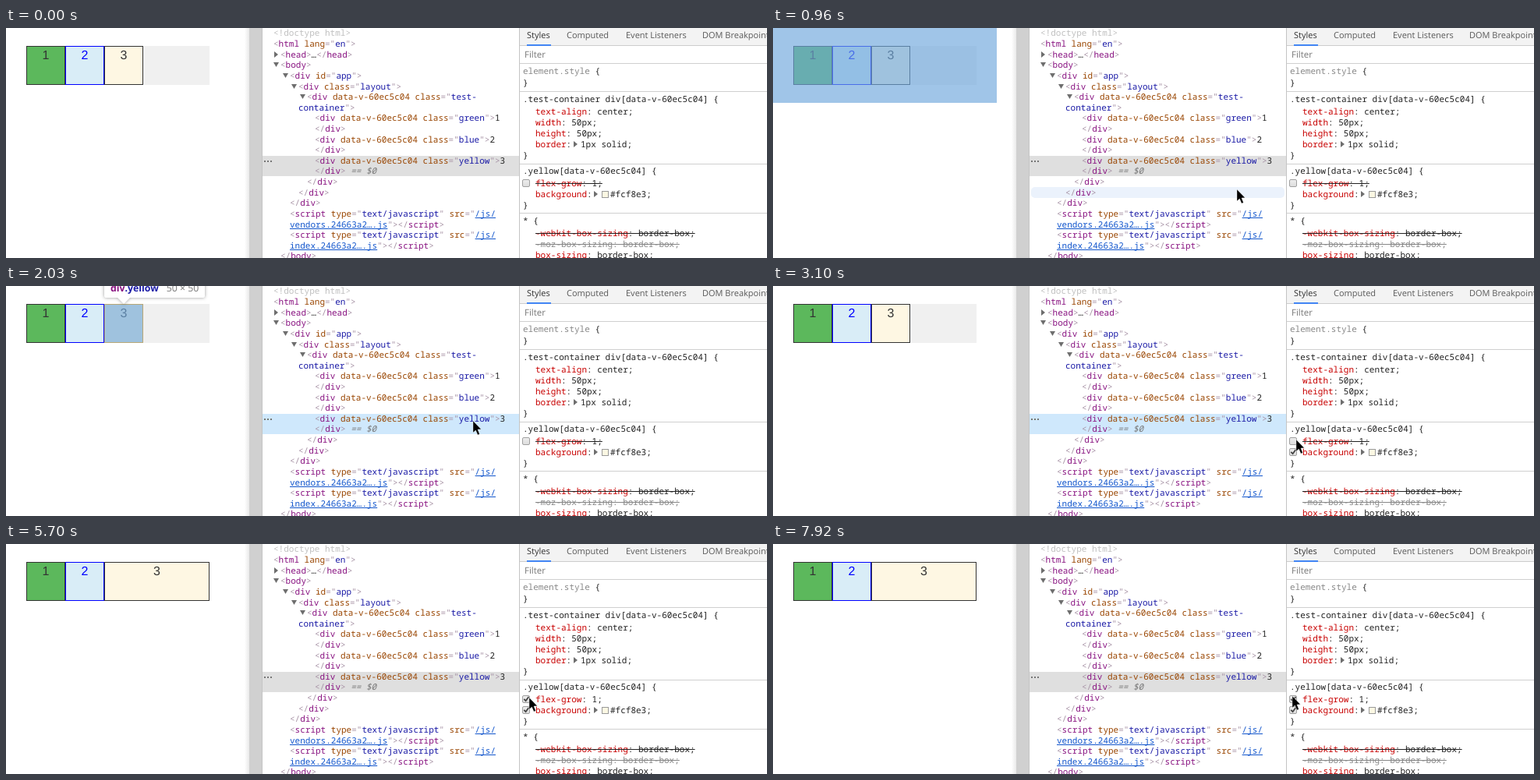
An HTML page with a canvas for the animation above (8 s loop, 976x295 px).

```html
<!DOCTYPE html>
<html lang="en">
<head>
<meta charset="utf-8">
<title>Flex grow in the inspector</title>
<style>
html, body { margin: 0; width: 100%; height: 100%; overflow: hidden; background: #fff; }
canvas { display: block; }
</style>
</head>
<body>
<canvas id="stage" width="976" height="295"></canvas>
<script>
const ctx = document.getElementById('stage').getContext('2d');
const LOOP = 8000;
const MONO = '11px "Noto Sans Mono", monospace';
const UI = '"Open Sans", sans-serif';
const COLORS = {
  p: '#a894a6', t: '#881280', a: '#994500', v: '#1a1aa6', l: '#1155cc',
  x: '#222', d: '#c0c0c0', g: '#888', i: '#777', r: '#c80000'
};

// "^k" switches to colour k of COLORS
const open = (name, rest = '') => `^p<^t${name}${rest}^p>`;
const close = name => `^p</^t${name}^p>`;
const attr = (name, value) => ` ^a${name}^p="^v${value}^p"`;
const scoped = ' ^adata-v-60ec5c04';
const item = (name, n) => open('div', scoped + attr('class', name)) + '^x' + n;
const script = '^p<^tscript' + attr('type', 'text/javascript') + ' ^asrc^p="^l/js/';
const file = name => `^l${name}.24663a2….js^p">` + close('script');

const TREE = [
  [343, '^d<!doctype html>'],
  [343, open('html', attr('lang', 'en'))],
  [352, open('head') + '^x…' + close('head'), 'right'],
  [352, open('body'), 'down'],
  [364, open('div', attr('id', 'app')), 'down'],
  [375, open('div', attr('class', 'layout')), 'down'],
  [386, '^p<^tdiv' + scoped + ' ^aclass^p="^vtest-', 'down'],
  [375, '^vcontainer^p">'],
  [396, item('green', 1)],
  [396, close('div')],
  [396, item('blue', 2)],
  [396, close('div')],
  [396, item('yellow', 3)],
  [396, close('div') + '^i == $0'],
  [386, close('div')],
  [375, close('div')],
  [364, close('div')],
  [364, script],
  [364, file('vendors')],
  [364, script],
  [364, file('index')],
  [352, close('body')]
];

const HOVER = { script: [233, 26], layout: [204, 14], blue: [137, 26] };

// Each step changes part of the state and holds until the next one
const STEPS = [
  [0, { cursor: null, hover: null, mark: null, focus: false, section: false, check: 0, grow: false }],
  [830, { cursor: [591, 237], hover: 'script' }],
  [960, { cursor: [595, 207], hover: 'layout', mark: 'layout' }],
  [1110, { cursor: [597, 187], hover: null, mark: 'yellow' }],
  [1260, { cursor: [599, 173] }],
  [2030, { focus: true }],
  [2440, { cursor: [616, 173] }],
  [2590, { cursor: [634, 178] }],
  [2710, { cursor: [652, 184] }],
  [2830, { cursor: [665, 190], mark: null, section: true }],
  [2950, { cursor: [671, 194] }],
  [3100, { cursor: [671, 197] }],
  [3410, { focus: false, check: 1 }],
  [3560, { check: 2 }],
  [3710, { grow: true }],
  [5850, { check: 0 }],
  [5970, { grow: false }],
  [6090, { cursor: [670, 196] }],
  [6240, { cursor: [640, 169], section: false, mark: 'yellow' }],
  [6390, { cursor: [625, 160], hover: 'blue', mark: 'blue' }],
  [6540, { cursor: [623, 154] }],
  [6670, { cursor: [621, 149] }],
  [6940, { cursor: [690, 172], hover: null, mark: null }],
  [7070, { cursor: [726, 188], section: true }],
  [7220, { cursor: [665, 194] }],
  [7650, { cursor: [666, 195], check: 1 }],
  [7800, { check: 2 }],
  [7920, { grow: true }]
];

const stateAt = t => Object.assign({}, ...STEPS.filter(s => s[0] <= t).map(s => s[1]));

function rect(x, y, w, h, color) {
  ctx.fillStyle = color;
  ctx.fillRect(x, y, w, h);
}

function frame(x, y, w, h, color) {
  ctx.strokeStyle = color;
  ctx.lineWidth = 1;
  ctx.strokeRect(x + .5, y + .5, w - 1, h - 1);
}

function poly(points, color) {
  ctx.beginPath();
  points.forEach(([x, y]) => ctx.lineTo(x, y));
  ctx.closePath();
  ctx.fillStyle = color;
  ctx.fill();
}

function text(str, x, y, font, color) {
  ctx.font = font;
  ctx.fillStyle = color;
  ctx.fillText(str, x, y);
  return ctx.measureText(str).width;
}

function code(str, x, y) {
  for (const run of str.split('^').slice(1)) {
    const key = run[0];
    const font = key === 'i' ? 'italic ' + MONO : MONO;
    const w = text(run.slice(1), x, y, font, COLORS[key]);
    if (key === 'l') rect(x, y + 1, w, 1, COLORS.l);
    x += w;
  }
  return x;
}

function struck(str, x, y, color) {
  const end = code(str, x, y);
  rect(x, y - 4, end - x, 1, color);
}

function arrow(x, y, dir) {
  poly(dir === 'right'
    ? [[x, y - 4], [x + 5, y], [x, y + 4]]
    : [[x - 1, y - 3], [x + 6, y - 3], [x + 2.5, y + 3]], '#6e6e6e');
}

function drawBox(x, w, n, fill, ink, edge) {
  rect(x, 23, w, 50, fill);
  frame(x, 23, w, 50, edge);
  ctx.textAlign = 'center';
  text(n, x + w / 2, 40, '16px "Liberation Sans", sans-serif', ink);
  ctx.textAlign = 'left';
}

function drawTip(x, name, w) {
  const mid = x + 25;
  ctx.save();
  ctx.shadowColor = 'rgba(0,0,0,.4)';
  ctx.shadowBlur = 4;
  ctx.beginPath();
  ctx.roundRect(x, -12, w, 27, 2);
  ctx.moveTo(mid - 8, 15);
  ctx.lineTo(mid, 23);
  ctx.lineTo(mid + 8, 15);
  ctx.fillStyle = '#fff';
  ctx.fill();
  ctx.restore();
  const bold = 'bold 12.3px ' + UI;
  let tx = x + 8;
  tx += text('div', tx, 7, bold, COLORS.t);
  tx += text('.' + name, tx, 7, bold, COLORS.v);
  text('50 × 50', tx + 10, 7, '12.3px ' + UI, '#777');
}

function drawMark(mark) {
  const content = 'rgba(111,168,220,.66)';
  if (mark === 'layout') return rect(0, 0, 287, 96, content);
  const x = mark === 'blue' ? 76 : 126;
  rect(x + 1, 24, 48, 48, content);
  frame(x, 23, 50, 50, 'rgba(255,229,153,.66)');
  drawTip(x, mark, mark === 'blue' ? 116 : 129);
}

function drawPage(s) {
  rect(26, 23, 235, 50, '#f0f0f0');
  drawBox(26, 50, '1', '#5cb85c', '#333', '#333');
  drawBox(76, 50, '2', '#d9edf7', '#00f', '#00f');
  drawBox(126, s.grow ? 135 : 50, '3', '#fef7e3', '#333', '#333');
  if (s.mark) drawMark(s.mark);
  const shade = ctx.createLinearGradient(306, 0, 312, 0);
  shade.addColorStop(0, '#fff');
  shade.addColorStop(1, '#e9e9e9');
  rect(306, 0, 6, 295, shade);
  rect(312, 0, 16, 295, '#d0d0d0');
  rect(328, 0, 1, 295, '#c4c4c4');
}

function drawTree(s) {
  rect(329, 0, 329, 295, '#fff');
  rect(329, 164, 329, 26, s.focus ? '#cfe8fc' : '#dfdfdf');
  for (let i = 0; i < 3; i++) rect(331 + i * 4, 170, 2, 2, '#777');
  if (s.hover) {
    const [y, h] = HOVER[s.hover];
    ctx.beginPath();
    ctx.roundRect(331, y, 325, h, 5);
    ctx.fillStyle = '#ebf2fc';
    ctx.fill();
  }
  TREE.forEach(([x, str, dir], i) => {
    const y = Math.round(10.4 + 13.62 * i);
    if (dir) arrow(x - 8, y - 4, dir);
    code(str, x, y);
  });
}

function checkbox(y, level) {
  const fill = ctx.createLinearGradient(0, y, 0, y + 10);
  fill.addColorStop(0, level === 1 ? '#cfcfcf' : '#eee');
  fill.addColorStop(1, level === 1 ? '#c0c0c0' : '#dcdcdc');
  ctx.beginPath();
  ctx.roundRect(662.5, y + .5, 9, 9, 1.5);
  ctx.fillStyle = fill;
  ctx.fill();
  ctx.strokeStyle = '#a0a0a0';
  ctx.lineWidth = 1;
  ctx.stroke();
  if (level < 2) return;
  ctx.beginPath();
  ctx.moveTo(664.3, y + 4.8);
  ctx.lineTo(666.6, y + 7.1);
  ctx.lineTo(670.4, y + 2);
  ctx.strokeStyle = '#444';
  ctx.lineWidth = 1.8;
  ctx.stroke();
}

function drawStyles(s) {
  rect(658, 0, 318, 295, '#fff');
  rect(658, 0, 318, 22, '#f3f3f3');
  rect(658, 22, 318, 1, '#ccc');
  rect(668, 21, 31, 2, '#4285f4');
  const tabs = { Styles: 668, Computed: 719, 'Event Listeners': 795, 'DOM Breakpoints': 893 };
  for (const name in tabs) {
    text(name, tabs[name], 13, '11px ' + UI, name === 'Styles' ? '#333' : '#5a5a5a');
  }
  text('Filter', 665, 38, '11.5px ' + UI, '#777');
  for (const y of [45, 81, 174, 237]) rect(658, y, 318, 1, '#d0d0d0');
  rect(658, 0, 1, 295, '#c4c4c4');

  code('^gelement.style ^x{', 663, 59);
  code('^x}', 663, 74);

  code('^x.test-container div[data-v-60ec5c04] {', 663, 95);
  code('^rtext-align^x: center;', 679, 111);
  code('^rwidth^x: 50px;', 679, 125);
  code('^rheight^x: 50px;', 679, 139);
  code('^rborder^x:', 679, 153);
  arrow(728, 149, 'right');
  code('^x1px solid;', 737, 153);
  code('^x}', 663, 167);

  code('^x.yellow[data-v-60ec5c04] {', 663, 187);
  checkbox(194, s.check);
  if (s.grow) code('^rflex-grow^x: 1;', 679, 203);
  else struck('^rflex-grow^x: 1;', 679, 203, '#222');
  if (s.section) checkbox(208, 2);
  code('^rbackground^x:', 679, 217);
  arrow(754, 213, 'right');
  rect(764, 209, 9, 9, '#fcf8e3');
  frame(764, 209, 9, 9, '#999');
  code('^x#fcf8e3;', 775, 217);
  code('^x}', 663, 231);

  code('^x* {', 663, 251);
  struck('^r-webkit-box-sizing^x: border-box;', 679, 267, '#222');
  struck('^g-moz-box-sizing: border-box;', 679, 281, '#888');
  code('^rbox-sizing^x: border-box;', 679, 295);
}

function drawCursor([x, y]) {
  const shape = [[0, 0], [0, 15], [3.4, 12], [6, 18], [8.4, 16.9], [6, 11], [10.4, 10.8]];
  poly(shape.map(([dx, dy]) => [x + dx, y + dy]), '#000');
  ctx.strokeStyle = 'rgba(255,255,255,.6)';
  ctx.lineWidth = .6;
  ctx.stroke();
}

function draw(now) {
  const s = stateAt((now - start) % LOOP);
  ctx.textRendering = 'geometricPrecision';
  rect(0, 0, 976, 295, '#fff');
  drawPage(s);
  drawTree(s);
  drawStyles(s);
  if (s.cursor) drawCursor(s.cursor);
}

const start = performance.now();

function tick() {
  draw(performance.now());
  requestAnimationFrame(tick);
}
tick();
</script>
</body>
</html>
```
